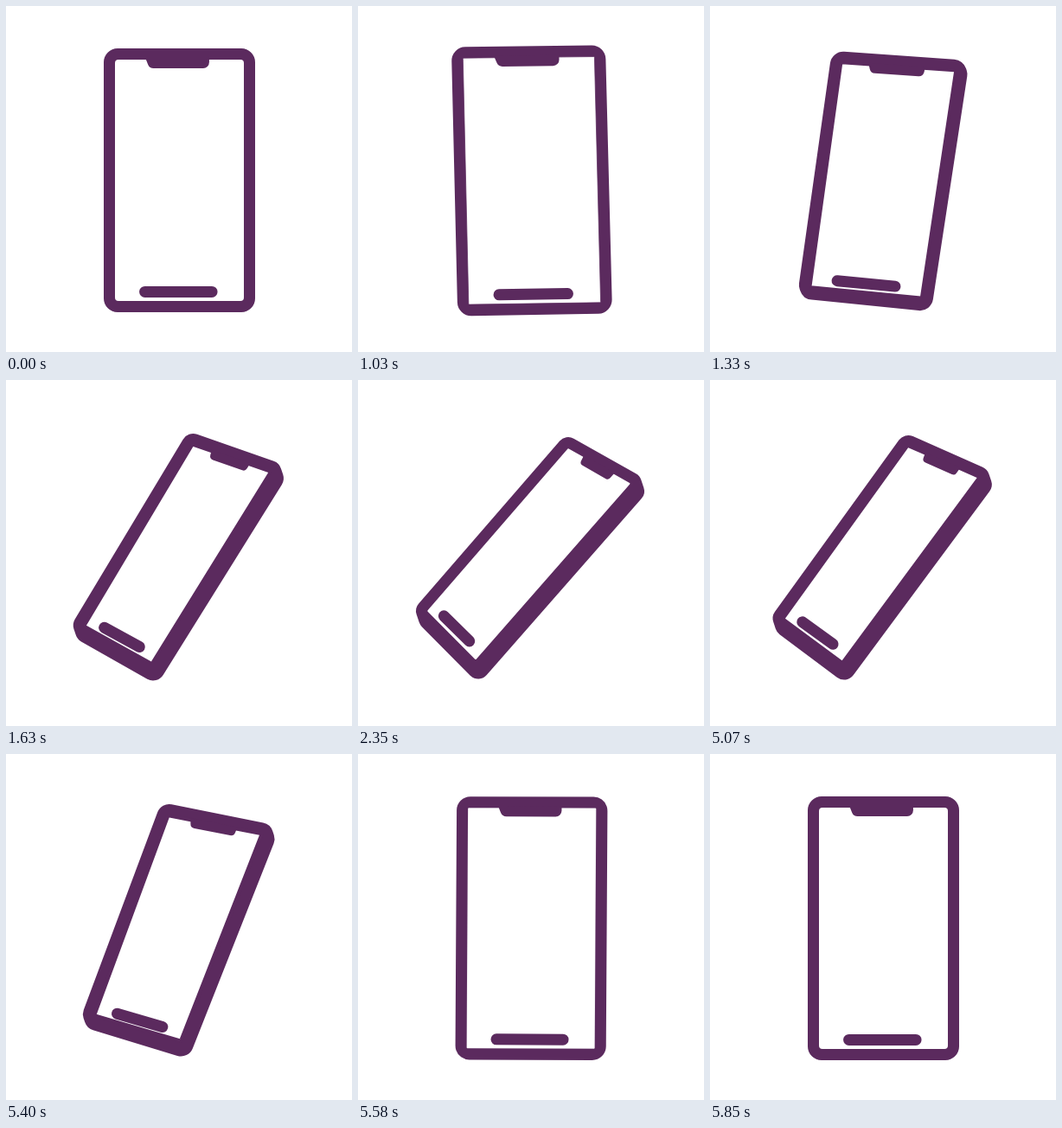
Animation of 400x400 px, one loop 5.88 s. Source, as an HTML page with a canvas:

```html
<!DOCTYPE html>
<html lang="en">
<head>
<meta charset="utf-8">
<title>Tilting phone</title>
<style>
html, body { margin: 0; width: 100%; height: 100%; overflow: hidden; background: #fff; }
canvas { display: block; width: 100vmin; height: 100vmin; }
</style>
</head>
<body>
<canvas id="stage"></canvas>
<script>
const canvas = document.getElementById('stage');
const ctx = canvas.getContext('2d');
const SIZE = 400, LOOP = 5880, STEP = 30, MOVE = 1350;
const TILT_AT = 1000, RETURN_AT = 4500;
const INK = '#5b2a5e', PAPER = '#fff';
const BORDER = 13, MIDDLE = 201.5;

// Screen corners clockwise from top left; everything else is placed from them.
const UPRIGHT = [[126, 62], [275, 62], [275, 341], [126, 341]];
const TILTED = [[243, 79], [315, 119.5], [136, 323.5], [80, 267]];
const DEPTH = [3, 9];

const lerp = (a, b, k) => a + (b - a) * k;
const mix = (p, q, k) => [lerp(p[0], q[0], k), lerp(p[1], q[1], k)];
const bezier = (p1, p2, t) => 3 * (1 - t) ** 2 * t * p1 + 3 * (1 - t) * t * t * p2 + t ** 3;

// Winds up backwards first, then eases out.
function ease(u) {
  let lo = 0, hi = 1;
  for (let i = 0; i < 30; i++) {
    const mid = (lo + hi) / 2;
    if (bezier(0.35, 0, mid) < u) lo = mid; else hi = mid;
  }
  return bezier(-0.66, 1.05, (lo + hi) / 2);
}

function tiltAt(ms) {
  const back = ms >= RETURN_AT;
  const elapsed = Math.floor((ms - (back ? RETURN_AT : TILT_AT)) / STEP) * STEP;
  const u = Math.min(1, Math.max(0, elapsed / MOVE));
  const v = back ? 1 - u : u;
  return v === 0 || v === 1 ? v : ease(v);
}

// The screen grows a little taller during the wind-up.
function faceAt(k) {
  const stretch = 1 + 0.2 * Math.max(0, -k);
  return UPRIGHT.map((corner, i) => {
    const [x, y] = mix(corner, TILTED[i], k);
    return [x, MIDDLE + (y - MIDDLE) * stretch];
  });
}

// Maps u, v in 0..1 onto the screen.
const onFace = ([tl, tr, br, bl], u, v) => mix(mix(tl, tr, u), mix(bl, br, u), v);

function trace(points) {
  ctx.beginPath();
  points.forEach(([x, y]) => ctx.lineTo(x, y));
}

function strokeInk(width) {
  ctx.lineWidth = width;
  ctx.stroke();
}

function fill(color) {
  ctx.closePath();
  ctx.fillStyle = color;
  ctx.fill();
}

function drawBody(face, k) {
  const inset = 3 * (1 - k), deep = Math.max(0, k);
  const [tl, tr, br, bl] = face.map(([x, y], i) => [
    x + (i === 0 || i === 3 ? inset : -inset),
    y + (i < 2 ? inset : -inset)
  ]);
  const back = [tr, br, bl].map(([x, y]) => [x + DEPTH[0] * deep, y + DEPTH[1] * deep]);
  trace([tl, tr, ...back, bl]);
  fill(INK);
  strokeInk(2 * (BORDER + inset));
}

function drawScreen(face, k) {
  const radius = k === 0 ? 4 : 1;
  ctx.beginPath();
  ctx.moveTo(...mix(face[0], face[1], 0.5));
  for (let i = 1; i <= 4; i++) ctx.arcTo(...face[i % 4], ...face[(i + 1) % 4], radius);
  fill(PAPER);
  // The border is thicker while turning.
  const extra = 9 * Math.abs(k * (1 - k));
  if (extra > 0) strokeInk(2 * extra);
}

function drawNotch(face, k) {
  const left = 0.268, right = 0.731, bottom = 0.036, top = -0.008;
  const radius = lerp(7, 4, k);
  const end = onFace(face, right, top);
  const corner = onFace(face, right, bottom);
  ctx.beginPath();
  ctx.moveTo(...onFace(face, left - 0.033, top));
  ctx.arcTo(...onFace(face, left, bottom), ...corner, radius);
  ctx.arcTo(...corner, ...end, radius);
  ctx.lineTo(...end);
  fill(INK);
}

function drawBar(face) {
  trace([0.232, 0.752].map(u => onFace(face, u, 0.962)));
  strokeInk(BORDER);
}

function draw(k) {
  const face = faceAt(k);
  ctx.fillStyle = PAPER;
  ctx.fillRect(0, 0, SIZE, SIZE);
  ctx.strokeStyle = INK;
  ctx.lineJoin = ctx.lineCap = 'round';
  drawBody(face, k);
  drawScreen(face, k);
  drawNotch(face, k);
  drawBar(face);
}

function resize() {
  const side = Math.min(innerWidth, innerHeight) * (devicePixelRatio || 1);
  canvas.width = canvas.height = Math.round(side);
  ctx.setTransform(side / SIZE, 0, 0, side / SIZE, 0, 0);
}

const start = performance.now();
function frame() {
  draw(tiltAt((performance.now() - start) % LOOP));
  requestAnimationFrame(frame);
}

addEventListener('resize', resize);
resize();
frame();
</script>
</body>
</html>
```
